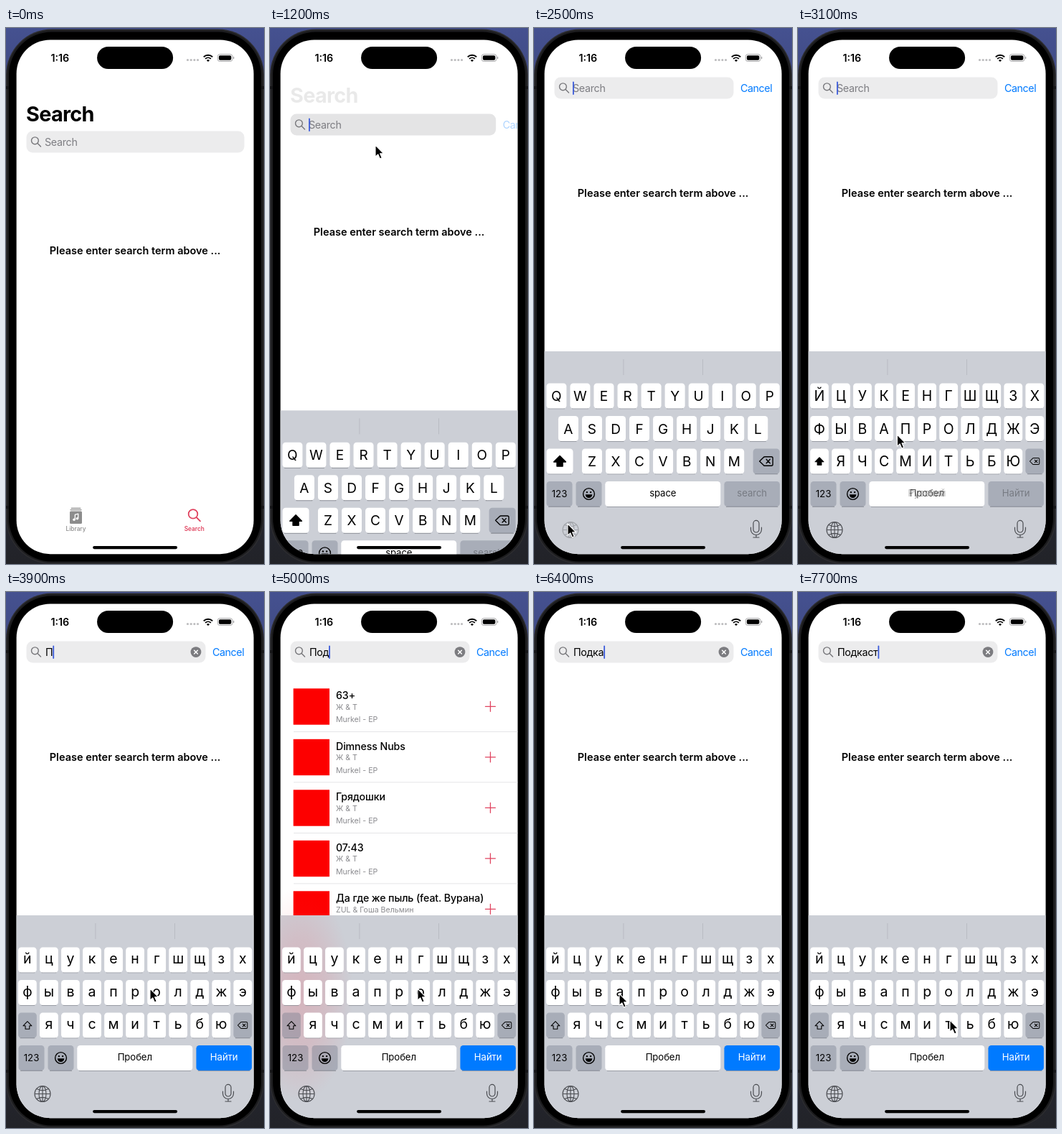
These frames come from a looping animation (360 px wide and 746 px high, 8 s). An HTML page:

```html
<!DOCTYPE html>
<html lang="en">
<head>
<meta charset="utf-8">
<title>Search screen</title>
<style>
  html, body { margin: 0; width: 100%; height: 100%; overflow: hidden; background: #222328; }
  svg { display: block; width: 360px; height: 746px; font-family: Inter, "Noto Sans", sans-serif; }
  text { white-space: pre; }
</style>
</head>
<body>
<script>
const NS = 'http://www.w3.org/2000/svg';
const PINK = '#e0435f', BLUE = '#007aff', GREY = '#8a8a8e';
const KEY = 'rgba(112,120,137,.4)';
const MID = 180.1;
const LOOP = 8000, FOCUS = 1050, SWITCH = 2580, LIST_ON = 4400, LIST_OFF = 5900;

function el(parent, tag, attrs = {}) {
  const node = document.createElementNS(NS, tag);
  for (const k in attrs) node.setAttribute(k, attrs[k]);
  parent.appendChild(node);
  return node;
}
const group = (p, x = 0, y = 0) => el(p, 'g', { transform: `translate(${x} ${y})` });
const rect = (p, x, y, width, height, rx, fill) => el(p, 'rect', { x, y, width, height, rx, fill });
const dot = (p, cx, cy, r, fill) => el(p, 'circle', { cx, cy, r, fill });
const line = (p, d, stroke, width = 1) => el(p, 'path', {
  d, stroke, fill: 'none', 'stroke-width': width, 'stroke-linecap': 'round', 'stroke-linejoin': 'round'
});
const shape = (p, d, fill) => el(p, 'path', { d, fill });
function text(p, x, y, str, size, fill = '#000', weight = 400, anchor = 'start', spacing = 0) {
  const node = el(p, 'text', {
    x, y, fill, 'font-size': size, 'font-weight': weight, 'text-anchor': anchor, 'letter-spacing': spacing
  });
  node.textContent = str;
  return node;
}
const show = (node, on) => node.setAttribute('visibility', on ? 'inherit' : 'hidden');
const move = (node, x, y) => node.setAttribute('transform', `translate(${x} ${y})`);
const clamp = v => Math.min(1, Math.max(0, v));
const smooth = v => v * v * (3 - 2 * v);

const svg = el(document.body, 'svg', { viewBox: '0 0 360 746' });
const defs = el(svg, 'defs');
function gradient(type, id, attrs, stops) {
  const g = el(defs, type, { id, ...attrs });
  for (const [offset, color, alpha = 1] of stops)
    el(g, 'stop', { offset, 'stop-color': color, 'stop-opacity': alpha });
}
gradient('linearGradient', 'wall', { x1: 0, y1: 0, x2: 0, y2: 1 }, [[0, '#455190'], [.5, '#2b3050'], [1, '#222328']]);
gradient('radialGradient', 'glow', {}, [[0, '#ff3040', .17], [.5, '#ff3040', .11], [1, '#ff3040', 0]]);
rect(el(defs, 'clipPath', { id: 'glass' }), 14.6, 16.5, 331, 715.7, 47);

// Phone body
rect(svg, 0, 0, 360, 746, 0, 'url(#wall)');
rect(svg, 0, 1.5, 360, 744.5, 64, '#2d2d30');
rect(svg, 1.5, 3, 357, 741.5, 62.5, '#1c1c1e');
rect(svg, 4, 5.5, 352, 737, 60, '#000');
for (const y of [81, 665]) for (const x of [0, 356]) rect(svg, x, y, 4, 4, 0, '#151517');

const screen = el(svg, 'g', { 'clip-path': 'url(#glass)' });
rect(screen, 14, 16, 332, 717, 0, '#fff');

// Tab bar
const lib = group(screen, 97.5, 679);
rect(lib, -8.5, -6.5, 17, 17.5, 1.6, '#8c8c8c');
line(lib, 'M-7.5-8.3H7.5M-6.3-10.6H6.3', '#8c8c8c', 1.2);
line(lib, 'M-1.2 5V-1.6L3.2-2.9V3.4', '#fff', 1.3);
dot(lib, -2.5, 5.2, 1.8, '#fff');
dot(lib, 1.9, 3.7, 1.8, '#fff');
text(screen, 97.5, 700.2, 'Library', 8.3, '#8c8c8c', 500, 'middle');
line(screen, 'M267.3 676.4a6.3 6.3 0 1 1-12.6 0a6.3 6.3 0 1 1 12.6 0M265.7 681l5.3 5.3', PINK, 1.8);
text(screen, 262.8, 700.2, 'Search', 8.3, PINK, 600, 'middle');

// Content
const message = text(screen, MID, 314.5, 'Please enter search term above ...', 14.5, '#000', 600, 'middle');
const list = group(screen);
const songs = [
  ['63+', 'Ж & Т', 'Murkel - EP'],
  ['Dimness Nubs', 'Ж & Т', 'Murkel - EP'],
  ['Грядошки', 'Ж & Т', 'Murkel - EP'],
  ['07:43', 'Ж & Т', 'Murkel - EP'],
  ['Да где же пыль (feat. Вурана)', 'ZUL & Гоша Вельмин', 'Murkel - EP']
];
songs.forEach(([name, artist, album], i) => {
  const row = group(list, 0, 134 + 70.5 * i);
  rect(row, 32.6, .3, 50.4, 50.4, 0, '#fd0000');
  text(row, 92, 15.2, name, 14.2, '#000', 500, 'start', -.1);
  text(row, 92, 29.5, artist, 10.6, GREY);
  text(row, 92, 47.4, album, 10.6, GREY);
  line(row, 'M300.5 25.3h14M307.5 18.3v14', PINK, 1.3);
  rect(row, 33, 60, 313, .8, 0, '#dedee1');
});

// Header
const header = group(screen);
const title = text(screen, 28, 129.8, 'Search', 28.8, '#000', 700, 'start', -.7);
const field = rect(header, 28.5, 143.5, 304, 30, 8.5, '#ececed');
line(header, 'M45.3 156.8a4.9 4.9 0 1 1-9.8 0a4.9 4.9 0 1 1 9.8 0M44.1 160.5l4.4 4.4', '#77777b', 1.4);
const hint = text(header, 54, 163.8, 'Search', 14.3, '#7d7d82', 400, 'start', -.3);
const typed = text(header, 55, 163.8, '', 14.3, '#000', 400, 'start', -.3);
const caret = rect(header, 54, 149.5, 1.8, 18.5, .9, '#3b5bdb');
const clear = group(header, 265, 158.6);
dot(clear, 0, 0, 7.4, '#7c7c80');
line(clear, 'M-2.4-2.4L2.4 2.4M2.4-2.4L-2.4 2.4', '#fff', 1.4);
const cancel = text(header, 288, 163.6, 'Cancel', 14.3, BLUE, 400, 'start', -.45);

// Status bar
text(screen, 75.3, 46.5, '1:16', 14.3, '#000', 600, 'middle');
rect(screen, MID - 53, 26, 106, 31, 15.5, '#000');
for (let i = 0; i < 4; i++) dot(screen, 253.5 + 4.7 * i, 44.5, 1.55, '#bcbcbe');
const wifi = group(screen, 282, 46.6);
line(wifi, 'M-6.2-6.4a9.2 9.2 0 0 1 12.4 0M-3.9-3.7a5.8 5.8 0 0 1 7.8 0', '#000', 1.9).setAttribute('stroke-linecap', 'butt');
shape(wifi, 'M0 .5L-2.1-1.7a3.1 3.1 0 0 1 4.2 0Z', '#000');
rect(screen, 295.3, 36.6, 20.6, 9.8, 3, 'none').setAttribute('stroke', '#a5a5a7');
rect(screen, 296.9, 38.2, 17.4, 6.6, 1.8, '#000');
rect(screen, 317, 39.8, 1.3, 3.4, .7, '#a5a5a7');

// Keyboard
const kb = group(screen, 0, 746);
rect(kb, 14, 0, 332, 300, 0, '#cccfd6');
const glow = el(kb, 'ellipse', { cx: 42, cy: 110, rx: 74, ry: 150, fill: 'url(#glow)' });
for (const x of [124.5, 235]) rect(kb, x, 11, .8, 22, 0, '#b3b6bd');

const ROWS = [44.5, 90, 135.5, 181];
function key(p, cx, row, w, fill = '#fff') {
  const g = group(p, cx, ROWS[row]);
  line(g, `M${3 - w / 2} 35.3h${w - 6}`, '#888b92', 1.1);
  const face = rect(g, -w / 2, 0, w, 35, 4.3, fill);
  return { g, face };
}
function shiftKey(p, cx, w, size) {
  const k = key(p, cx, 2, w);
  const g = el(k.g, 'g', { transform: `translate(0 18) scale(${size})` });
  k.icon = el(g, 'path', {
    d: 'M0-8L8.3.4H4V6.5H-4V.4H-8.3Z', stroke: '#000', 'stroke-width': 1.5, 'stroke-linejoin': 'round'
  });
  return k;
}
function backKey(p, cx, w, size) {
  const g = el(key(p, cx, 2, w, KEY).g, 'g', { transform: `translate(0 17.5) scale(${size})` });
  line(g, 'M-9.5 0L-3.8-5.6Q-3-6.3-2-6.3H7Q9-6.3 9-4.3V4.3Q9 6.3 7 6.3H-2Q-3 6.3-3.8 5.6ZM0-2.7L5.2 2.7M5.2-2.7L0 2.7', '#000', 1.4);
}
// One centred row of letter keys
function letters(p, str, row, pitch, w, size) {
  return [...str].map((ch, i) => {
    const x = MID + pitch * (i - (str.length - 1) / 2);
    const k = key(p, x, row, w);
    return { ch, x, row, label: text(k.g, 0, 24.6, ch, size, '#000', 400, 'middle') };
  });
}

const latin = group(kb);
['QWERTYUIOP', 'ASDFGHJKL', 'ZXCVBNM'].forEach((s, row) => letters(latin, s, row, 33.05, 28, 19));
shiftKey(latin, 36, 37, 1);
backKey(latin, 324.2, 37, 1);

const cyr = group(kb);
const cyrKeys = ['йцукенгшщзх', 'фывапролджэ', 'ячсмитьбю']
  .flatMap((s, row) => letters(cyr, s, row, 30.05, 25.8, 19.5));
const cyrShift = shiftKey(cyr, 29.9, 25.8, .72);
backKey(cyr, 330.3, 25.8, .72);

text(key(kb, 35.5, 3, 36, KEY).g, 0, 22.3, '123', 13.2, '#000', 400, 'middle');
const smile = group(key(kb, 76.5, 3, 36, KEY).g, 0, 17.5);
el(smile, 'circle', { r: 7.9, fill: 'none', stroke: '#000', 'stroke-width': 1.4 });
dot(smile, -2.6, -2.4, 1.2, '#000');
dot(smile, 2.6, -2.4, 1.2, '#000');
shape(smile, 'M-4.8.8H4.8A4.8 4.8 0 0 1-4.8.8Z', '#000');
const space = key(kb, 179.8, 3, 161).g;
const spaceLabel = s => text(space, 0, 21.2, s, 13.2, '#000', 400, 'middle', -.1);
const spaceEn = spaceLabel('space'), spaceLang = spaceLabel('Русский'), spaceRu = spaceLabel('Пробел');
const go = key(kb, 304.2, 3, 77.5, KEY);
const goLabel = text(go.g, 0, 21.2, '', 13.2, '#777b83', 400, 'middle', -.1);

const globe = group(kb, 51, 248.5);
line(globe, 'M11 0A11 11 0 1 1-11 0A11 11 0 1 1 11 0M5 0A5 11 0 1 1-5 0A5 11 0 1 1 5 0M0-11V11M-11 0H11M-8.2-7Q0-2.8 8.2-7M-8.2 7Q0 2.8 8.2 7', '#4b4d52', 1.1);
const mic = group(kb, 310, 247);
line(mic, 'M-4-7.6a4 4 0 0 1 8 0V1a4 4 0 0 1-8 0ZM-7.5-2V1a7.5 7.5 0 0 0 15 0V-2M0 8.5V12M-4 12H4', '#4b4d52', 1.2);

// Enlarged letter over a pressed key
const popup = group(kb);
popup.style.filter = 'drop-shadow(0 0 1.5px rgba(0,0,0,.35))';
shape(popup, 'M-17-55H17q8 0 8 8V-16C25-4 13-6 13 6V31q0 4-4 4H-9q-4 0-4-4V6C-13-6-25-4-25-16V-47q0-8 8-8Z', '#fff');
const popLabel = text(popup, 0, -21, '', 29, '#000', 400, 'middle');

rect(screen, MID - 59, 721, 118, 4.2, 2.1, '#000');

const pointer = group(svg);
el(pointer, 'path', {
  d: 'M0 0V16.2L3.7 12.8L6.4 19L9.2 17.8L6.6 11.8H11.6Z',
  fill: '#000', stroke: '#fff', 'stroke-width': 1.1, 'stroke-linejoin': 'round'
});

// Letter, press time
const presses = [['П', 3400], ['о', 4150], ['д', 4650], ['к', 5190], ['а', 6200], ['с', 6900], ['т', 7560]];
const HOLD = 120;

// Time, x, y of the pointer tip
const path = [
  [60, 196, 420], [300, 231, 198], [450, 231, 198], [700, 147, 163], [1420, 147, 163],
  [1900, 90, 680], [2300, 47, 690], [2680, 47, 690], [3200, 148, 553], [3520, 148, 553],
  [3900, 201, 552], [4100, 208, 554], [4280, 208, 554], [4600, 266, 554], [4750, 266, 554],
  [5000, 206, 552], [5100, 148, 526], [5190, 119, 512], [5820, 119, 512], [6150, 119, 559],
  [6650, 119, 559], [6880, 119, 598], [7080, 119, 598], [7500, 212, 596]
];
function pointerAt(t) {
  const i = path.findIndex(p => p[0] > t);
  if (i < 0) return path[path.length - 1].slice(1);
  const [t0, x0, y0] = path[i - 1], [t1, x1, y1] = path[i];
  const k = smooth((t - t0) / (t1 - t0));
  return [x0 + (x1 - x0) * k, y0 + (y1 - y0) * k];
}

let lastText = null, caretX = 54;
function setText(value) {
  if (value === lastText) return;
  lastText = value;
  typed.textContent = value;
  caretX = value ? 55 + typed.getComputedTextLength() : 54;
  const has = value !== '';
  show(hint, !has);
  show(clear, has);
  go.face.setAttribute('fill', has ? BLUE : KEY);
  goLabel.setAttribute('fill', has ? '#fff' : '#777b83');
  for (const k of cyrKeys) {
    k.label.textContent = has ? k.ch : k.ch.toUpperCase();
    k.label.setAttribute('y', has ? 22.6 : 24.6);
  }
  cyrShift.face.setAttribute('fill', has ? KEY : '#fff');
  cyrShift.icon.setAttribute('fill', has ? 'none' : '#000');
}

function render(t) {
  const open = clamp((t - FOCUS) / 400);
  const p = smooth(open);
  const rise = 1 - Math.pow(1 - open, 2.7);
  move(header, 0, -75 * p);
  move(title, 0, -82 * p);
  title.setAttribute('opacity', Math.pow(1 - p, 6.5));
  field.setAttribute('width', 304 - 54 * p);
  const shade = 236 - 10 * Math.sin(Math.PI * p);
  field.setAttribute('fill', `rgb(${shade},${shade},${shade + 1})`);
  cancel.setAttribute('x', 342 - 54 * p);
  cancel.setAttribute('opacity', p);
  message.setAttribute('y', 314.5 - 80 * p);
  move(kb, 0, 746 - 296 * rise);

  const done = presses.filter(k => k[1] <= t);
  setText(done.map(k => k[0]).join(''));
  const last = done[done.length - 1];
  const since = t - (last ? last[1] : FOCUS);
  caret.setAttribute('x', caretX);
  show(caret, t >= FOCUS && since % 1000 < 505);

  const pressed = last && since < HOLD;
  show(popup, pressed);
  if (pressed) {
    const k = cyrKeys.find(c => c.ch === last[0].toLowerCase());
    move(popup, k.x, ROWS[k.row]);
    popLabel.textContent = last[0];
  }

  const ru = t >= SWITCH;
  show(latin, !ru);
  show(cyr, ru);
  show(spaceEn, !ru);
  const fade = clamp((t - SWITCH - 350) / 250);
  spaceLang.setAttribute('opacity', ru ? 1 - fade : 0);
  spaceRu.setAttribute('opacity', ru ? fade : 0);
  goLabel.textContent = ru ? 'Найти' : 'search';
  globe.setAttribute('opacity', t > 2400 && t < SWITCH ? .35 : 1);

  const found = t >= LIST_ON && t < LIST_OFF;
  show(list, found);
  show(glow, found);
  show(message, !found);

  const visible = t >= path[0][0];
  show(pointer, visible);
  if (visible) move(pointer, ...pointerAt(t));
}

const start = performance.now();
function tick() {
  render((performance.now() - start) % LOOP);
  requestAnimationFrame(tick);
}
tick();
</script>
</body>
</html>
```
